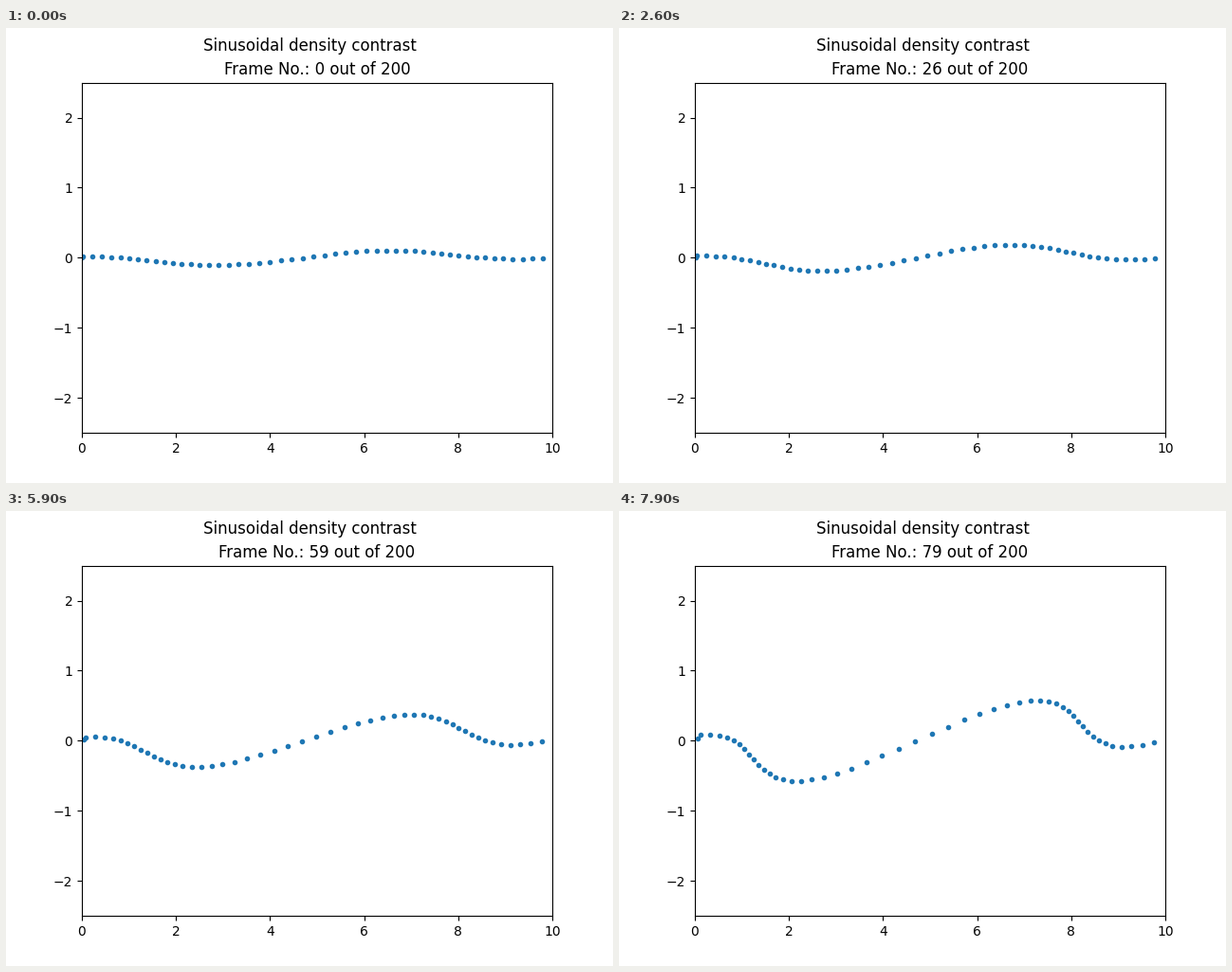
A matplotlib script for the animation above (8000 ms loop, 640 by 480 pixels).

```python
import numpy as np
import matplotlib.pyplot as plt
from matplotlib.animation import FuncAnimation

BOX = 10.0
COUNT = 50
FRAMES = 80
TOTAL = 200

GROWTH = 0.0214   # exponential growth per step
SHIFT0 = 0.116    # initial displacement amplitude
SPEED0 = 0.0823   # initial velocity amplitude

# Displacement field of a sinusoidal overdensity with its mean removed
q = np.linspace(0, BOX, COUNT)
psi = np.cos(q) + np.sin(q).mean() * q
psi -= psi.mean()

plt.rcParams["font.family"] = "DejaVu Sans"
fig, ax = plt.subplots(figsize=(6.4, 4.8), dpi=100)
fig.suptitle("Sinusoidal density contrast")
ax.set_xlim(0, BOX)
ax.set_ylim(-2.5, 2.5)
title = ax.set_title("")
dots, = ax.plot([], [], ".", color="#1f77b4")


def update(step):
    growth = np.exp(GROWTH * step)
    dots.set_data((q + SHIFT0 * growth * psi) % BOX, SPEED0 * growth * psi)
    title.set_text(f"Frame No.: {step} out of {TOTAL}")
    return dots, title


anim = FuncAnimation(fig, update, frames=FRAMES, interval=100,
                     repeat=True, repeat_delay=0, blit=False)
plt.show()
```
